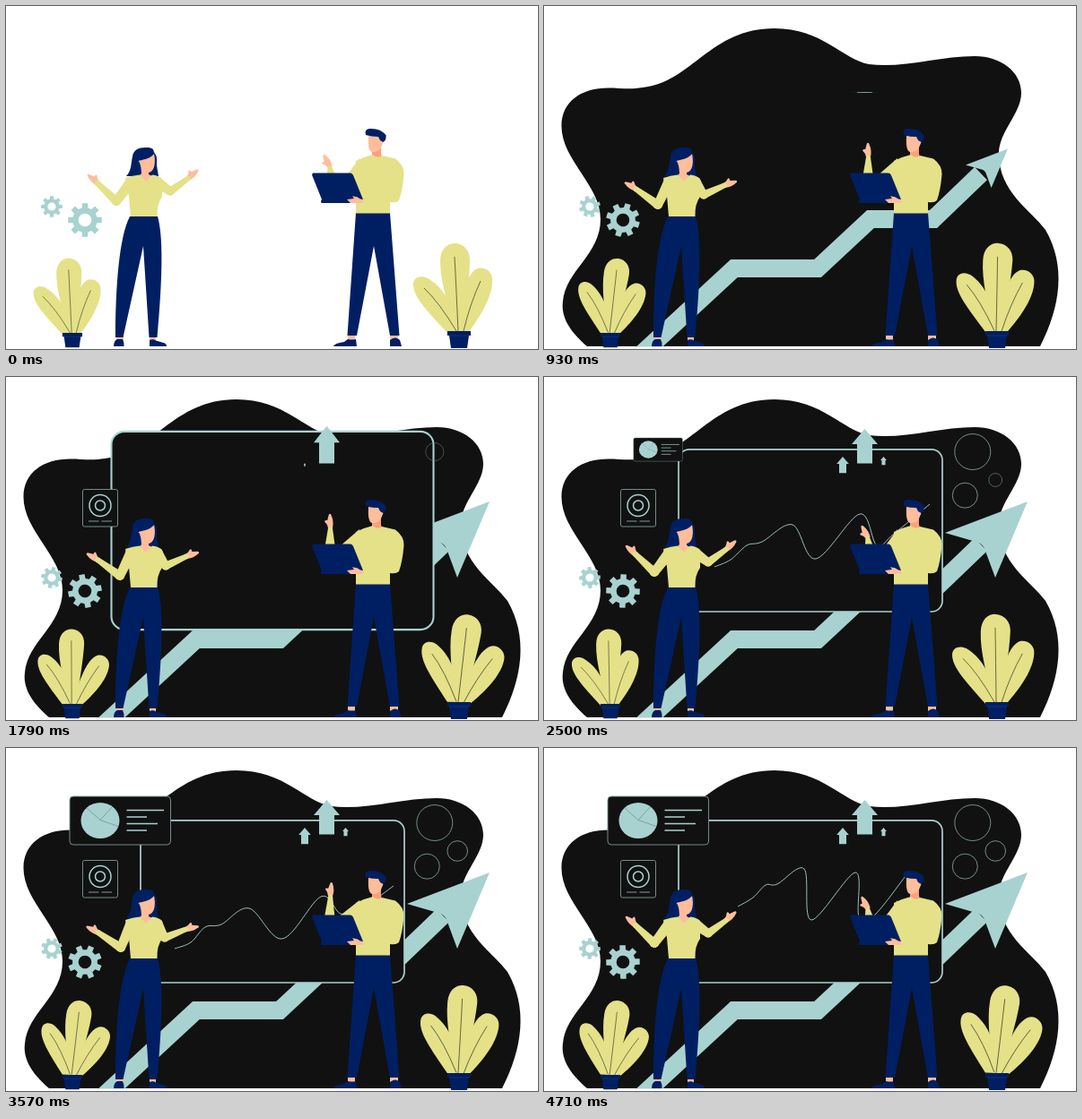
Recreate the animation shown at these times as an HTML page with a canvas. Size 593 by 383 pixels, loop 4780 ms.

```html
<!DOCTYPE html>
<html lang="en">
<head>
<meta charset="utf-8">
<title>Business presentation</title>
<style>
  html, body { margin: 0; width: 100%; height: 100%; overflow: hidden; background: #fff; }
  canvas { display: block; }
</style>
</head>
<body>
<canvas id="stage" width="593" height="383"></canvas>
<script>
const ctx = document.getElementById('stage').getContext('2d');
const LOOP = 4780;
const NAVY = '#001f62', LIME = '#e4e188', TEAL = '#a8d2d0', SKIN = '#ffbd9c', NECK = '#fca07c';
const DARK = '#111', GREY = '#7f9a99';

const lerp = (a, b, k) => a + (b - a) * k;
const ease = k => (1 - Math.cos(Math.PI * Math.min(1, Math.max(0, k)))) / 2;
const grow = (t, start, span = 500) => ease((t - start) / span);

// Eased value through [time, value] keys.
function track(t, keys) {
  if (t <= keys[0][0]) return keys[0][1];
  for (let i = 1; i < keys.length; i++) {
    const [t0, v0] = keys[i - 1], [t1, v1] = keys[i];
    if (t <= t1) return lerp(v0, v1, ease((t - t0) / (t1 - t0)));
  }
  return keys[keys.length - 1][1];
}
const pop = (t, start) => track(t - start, [[0, 0], [650, 1.31], [1050, 1]]);

function fill(d, color) {
  ctx.fillStyle = color;
  ctx.fill(new Path2D(d), 'evenodd');
}
function stroke(d, color, width) {
  ctx.strokeStyle = color;
  ctx.lineWidth = width;
  ctx.stroke(new Path2D(d));
}
function circle(x, y, r, color, width) {
  ctx.beginPath();
  ctx.arc(x, y, r, 0, 2 * Math.PI);
  if (width) { ctx.strokeStyle = color; ctx.lineWidth = width; ctx.stroke(); }
  else { ctx.fillStyle = color; ctx.fill(); }
}
function panel(x, y, w, h, r, color, width) {
  ctx.beginPath();
  ctx.roundRect(x, y, w, h, r);
  ctx.fillStyle = DARK;
  ctx.fill();
  ctx.strokeStyle = color;
  ctx.lineWidth = width;
  ctx.stroke();
}
function scaled(x, y, sx, sy, draw) {
  if (sx <= 0 || sy <= 0) return;
  ctx.save();
  ctx.translate(x, y);
  ctx.scale(sx, sy);
  ctx.translate(-x, -y);
  draw();
  ctx.restore();
}

function blob(t) {
  const s = grow(t, 300, 630);
  scaled(300, 199, s, s, () => fill(
    'M48 380C27 362 19 346 21 330C24 295 63 278 63 238C63 200 19.500 172 19.500 134C19.500 107 41 91.500 72 91.500' +
    'C85 91.500 96 93.500 110 91C165 85 185 25 257 25C310 25 334 60 362 65C400 70 440 56 480 56' +
    'C510 56 532 74 532 97C532 120 507 140 507 165C507 208 543 228 559 250C582 290 576 335 553 380Z', DARK));
}

function risingArrow(t) {
  const length = 560, shown = Math.min(1, t / 470);
  if (shown > 0) {
    ctx.save();
    ctx.beginPath();
    ctx.rect(0, 0, 593, 380.5);
    ctx.clip();
    if (shown < 1) ctx.setLineDash([length * shown, 2 * length]);
    stroke('M104 393L212 293H305L364 238H434L487 187', TEAL, 20);
    ctx.restore();
  }
  const s = track(t, [[350, 0], [500, .337], [930, .51], [1500, 1]]);
  scaled(494, 181, s, s, () => fill('M447 174L539 139L503 224L493 197Q490 184 478 183Z', TEAL));
}

function board(t) {
  const s = pop(t, 1250);
  scaled(297, 171, s, s, () => panel(150, 80.8, 294, 181.2, 12, TEAL, 1.7));
}

const upArrow = 'M343 75L357.5 58L372 75H366V96.5H349V75Z';
function upArrows(t) {
  scaled(357, 97, 1, pop(t, 880), () => fill(upArrow, TEAL));
  for (const [x, y, size, start] of [[333, 98, .47, 1650], [378.5, 93.5, .24, 1850]]) {
    const s = size * grow(t, start);
    if (s <= 0) continue;
    ctx.save();
    ctx.translate(x, y);
    ctx.scale(s, s);
    ctx.translate(-357.5, -77);
    fill(upArrow, TEAL);
    ctx.restore();
  }
}

function bubbles(t) {
  for (const [x, y, r, start] of [[477.8, 83.5, 20, 1540], [469.3, 132.2, 14, 1800], [503.2, 115, 11.3, 2200]]) {
    const k = grow(t, start);
    ctx.globalAlpha = k;
    if (k > 0) circle(x, y, r * k, GREY, .9);
  }
  ctx.globalAlpha = 1;
}

function gaugeCard(t) {
  const s = grow(t, 1000);
  scaled(105, 146, s, s, () => {
    panel(85.5, 125.5, 39, 41.5, 2, GREY, .9);
    circle(105, 143.5, 12, TEAL, 1.5);
    circle(105, 143.5, 5.5, TEAL, 1.5);
    stroke('M92 161H103.500M106.500 161H118', GREY, 1);
  });
}

function pieCard(t) {
  const s = pop(t, 2230);
  scaled(127, 81, s, s, () => {
    panel(71, 54, 112.5, 54, 4, GREY, .9);
    ctx.beginPath();
    ctx.ellipse(105, 81, 21.5, 20, 0, 0, 2 * Math.PI);
    ctx.fillStyle = TEAL;
    ctx.fill();
    stroke('M90 67L105 80.500L118 66M105 80.500L125 87.500', '#6d8b8a', .7);
    stroke('M134.500 69.500H176M134.500 77H157M134.500 84.500H169M134.500 92H157', TEAL, 1.4);
  });
}

const curveStart = [[190,212],[208,204],[226,188],[243,184],[277,165],[303,203],[352,153],[371,188],[390,175],[430,142]];
const curveLow = [[188,224],[206,217],[222,200],[240,197],[271,179],[308,213],[351,166],[373,185],[395,180],[432,154]];
const curveEnd = [[216,177],[233,167],[247,153],[260,152],[290,135],[298,192],[347,139],[351,188],[368,187],[403,143]];
function chartLine(t) {
  const shown = grow(t, 1850, 550);
  if (!shown) return;
  const down = grow(t, 2500, 1070), up = grow(t, 3570, 1140);
  const pts = curveStart.map((p, i) => [0, 1].map(
    j => lerp(lerp(p[j], curveLow[i][j], down), curveEnd[i][j], up)));
  const at = i => pts[Math.min(pts.length - 1, Math.max(0, i))];
  ctx.save();
  if (shown < 1) ctx.setLineDash([400 * shown, 900]);
  ctx.beginPath();
  ctx.moveTo(...pts[0]);
  for (let i = 0; i < pts.length - 1; i++) {
    const [a, b, c, d] = [at(i - 1), at(i), at(i + 1), at(i + 2)];
    ctx.bezierCurveTo(b[0] + (c[0] - a[0]) / 6, b[1] + (c[1] - a[1]) / 6,
                      c[0] - (d[0] - b[0]) / 6, c[1] - (d[1] - b[1]) / 6, ...c);
  }
  ctx.strokeStyle = TEAL;
  ctx.lineWidth = .9;
  ctx.stroke();
  ctx.restore();
}

function gear(x, y, r, turn) {
  ctx.save();
  ctx.translate(x, y);
  ctx.rotate(turn);
  ctx.scale(r / 19, r / 19);
  ctx.beginPath();
  for (let i = 0; i < 8; i++) {
    for (const [radius, offset] of [[14, -.24], [19, -.17], [19, .17], [14, .24]]) {
      const a = i * Math.PI / 4 + offset;
      ctx.lineTo(radius * Math.cos(a), radius * Math.sin(a));
    }
  }
  ctx.closePath();
  ctx.moveTo(7.3, 0);
  ctx.arc(0, 0, 7.3, 0, 2 * Math.PI);
  ctx.fillStyle = TEAL;
  ctx.fill('evenodd');
  ctx.restore();
}

// Left, right and middle leaf: shape, vein, full swing.
const leaves = [
  ['M-13 2C-35-22-51-38-51-52C-51-60-43-63-35-59C-20-50-8-35 0 0Z', 'M-3 0Q-22-32-39-48', .19],
  ['M10 2C25-18 38-40 37-58C37-66 29-72 21-70C8-65 3-40 0 0Z', 'M5 0Q12-30 24-56', .25],
  ['M-5 0C-12-30-21-55-21-78C-21-92-13-98-5-98C5-98 12-90 12-80C12-60 8-30 5 0Z', 'M-1 0Q-3-45-5-83', .165],
];
function plant(t, x, y, size, keys, leads) {
  ctx.save();
  ctx.translate(x, y);
  ctx.scale(size, size);
  const swayed = (i, draw) => {
    ctx.save();
    ctx.rotate(leaves[i][2] * track(t + leads[i] * grow(t, 0, 1000), keys));
    draw();
    ctx.restore();
  };
  leaves.forEach(([shape], i) => swayed(i, () => fill(shape, LIME)));
  leaves.forEach(([, vein], i) => swayed(i, () => stroke(vein, '#4d4d33', .8)));
  fill('M-13 0H13V5H11L9 19H-9L-11 5H-13Z', NAVY);
  stroke('M-11 5H11', '#24407c', .5);
  ctx.restore();
}

// Tapered limb with round ends.
function limb(x1, y1, r1, x2, y2, r2) {
  const a = Math.atan2(y2 - y1, x2 - x1) + Math.PI / 2, c = Math.cos(a), s = Math.sin(a);
  ctx.beginPath();
  ctx.moveTo(x1 + r1 * c, y1 + r1 * s);
  ctx.lineTo(x2 + r2 * c, y2 + r2 * s);
  ctx.lineTo(x2 - r2 * c, y2 - r2 * s);
  ctx.lineTo(x1 - r1 * c, y1 - r1 * s);
  ctx.fillStyle = LIME;
  ctx.fill();
  circle(x1, y1, r1, LIME);
  circle(x2, y2, r2, LIME);
}
function hand(x, y, tipX, tipY, flip) {
  ctx.save();
  ctx.translate(x, y);
  ctx.rotate(Math.atan2(tipY - y, tipX - x));
  ctx.scale(1, flip);
  fill('M-1-2.500Q3-3 6-6.500Q8-7 7.500-3.500L14-2Q16 0 13 .8Q7 4-1 2.500Z', SKIN);
  ctx.restore();
}

function woman(a) {
  const mix = (u, d) => lerp(u, d, a);
  fill('M134 190C140 184 139 177 141 168C142 160 149 157.500 157 158C163 158 165 160 165 164C169 167 168 172 168 178L170 190Z', NAVY);
  fill('M150 176H159V188L163 190L156 198L148 190L151 187Z', SKIN);
  fill('M147.500 173L165 165C167 174 166 185 159 186C153 185 150 180 149 175Z', SKIN);
  fill('M145 173C152 172 161 171 166 164L158 159L146 163Z', NAVY);
  fill('M123 366H131V374H123ZM160 366H167V374H160Z', SKIN);
  fill('M120 380Q120 374 124 372H130Q132 376 131.500 380ZM160 380V373Q164 371.500 167 373.500L177 376.500Q179.500 378 179 380Z', NAVY);
  fill('M138 235H169C175 255 175 300 168.500 370H159.500L153 268L130.500 370H122C122 315 126 258 138 235Z', NAVY);

  const elbowL = [mix(123, 127), mix(218, 222)], wristL = [mix(102, 102.5), mix(198, 204.5)];
  hand(...wristL, 89, mix(187.5, 197.5), -1);
  limb(139, 197, 6, ...elbowL, 5);
  limb(...elbowL, 5, ...wristL, 3);
  const elbowR = [mix(183, 178), mix(207, 211)], wristR = [mix(203, 201), mix(192.5, 200.5)];
  hand(...wristR, 214, mix(184, 197), 1);
  limb(169, 197, 6, ...elbowR, 4.5);
  limb(...elbowR, 4.5, ...wristR, 2.8);
  fill('M133 192Q141 189 149 188.500L156 196L163 188.500Q170 189 174 193L174 213Q168 221 168.500 235H139L137 212Z', LIME);
}

function man(a) {
  const mix = (u, d) => lerp(u, d, a);
  const wristX = mix(361, 361.5), wristY = mix(179, 167.5);
  hand(wristX, wristY, mix(354.5, 362), mix(165, 152), 1);
  limb(mix(363.5, 361), 198, 7, wristX, wristY + 2, 2.6);
  fill('M408 156H418V165Q421 170 412 172L408 168Z', NECK);
  fill('M404 145L418 146L420.500 152L418 158Q415 163.500 408 163Q403 162 404 145Z', SKIN);
  fill('M401 144Q399 138 405 137Q417 136 423.500 144Q424.500 149 420.500 152L417 150L415 146Q407 146 401 144Z', NAVY);
  fill('M381 364H389V373H381ZM428 364H437V373H428Z', SKIN);
  fill('M365 380Q366 376.500 377 375L381 372Q386 373 390 372L391 380ZM428 380V373Q434 368 439 373L441 380Z', NAVY);
  fill('M390 231H428L438.500 368H428L410 268L391 368H380.500Z', NAVY);
  fill(`M394 170L${mix(380, 372)} 189L393 204Z`, LIME);
  fill('M390 173Q400 168 409 166Q414 171 419 167L434 170.500Q444 178 443.500 188Q442 206 438 217Q435 220 428 219V231.500H390Z', LIME);
  fill('M342 186.500H384Q386 186.500 387 189L398 216L396 220H352Q350 219 352 216L341 188.500Z', NAVY);
  fill('M380 216L388 215L386 212.500Q391 212 395 215.500L398 216V220H384Z', SKIN);
}

function render() {
  const t = performance.now() % LOOP;
  const gesture = track(t, [[0, 0], [1000, 1], [1750, 1], [2390, 0], [2550, 0], [3500, 1.25], [3800, 1.2], [4700, 0]]);
  const turn = t / LOOP * Math.PI / 2;

  ctx.fillStyle = '#fff';
  ctx.fillRect(0, 0, 593, 383);
  blob(t);
  risingArrow(t);
  board(t);
  upArrows(t);
  bubbles(t);
  gaugeCard(t);
  pieCard(t);
  chartLine(t);
  gear(51, 224, 12, -turn);
  gear(88, 239, 19, turn);
  plant(t, 74, 365, .85, [[0, 0], [1500, 1], [2550, 0], [3800, 1]], [200, 0, 400]);
  plant(t, 505, 363, 1, [[430, 0], [1750, 1], [2950, 0], [4150, 1]], [200, 0, 80]);
  woman(gesture);
  man(gesture);
  requestAnimationFrame(render);
}
render();
</script>
</body>
</html>
```
